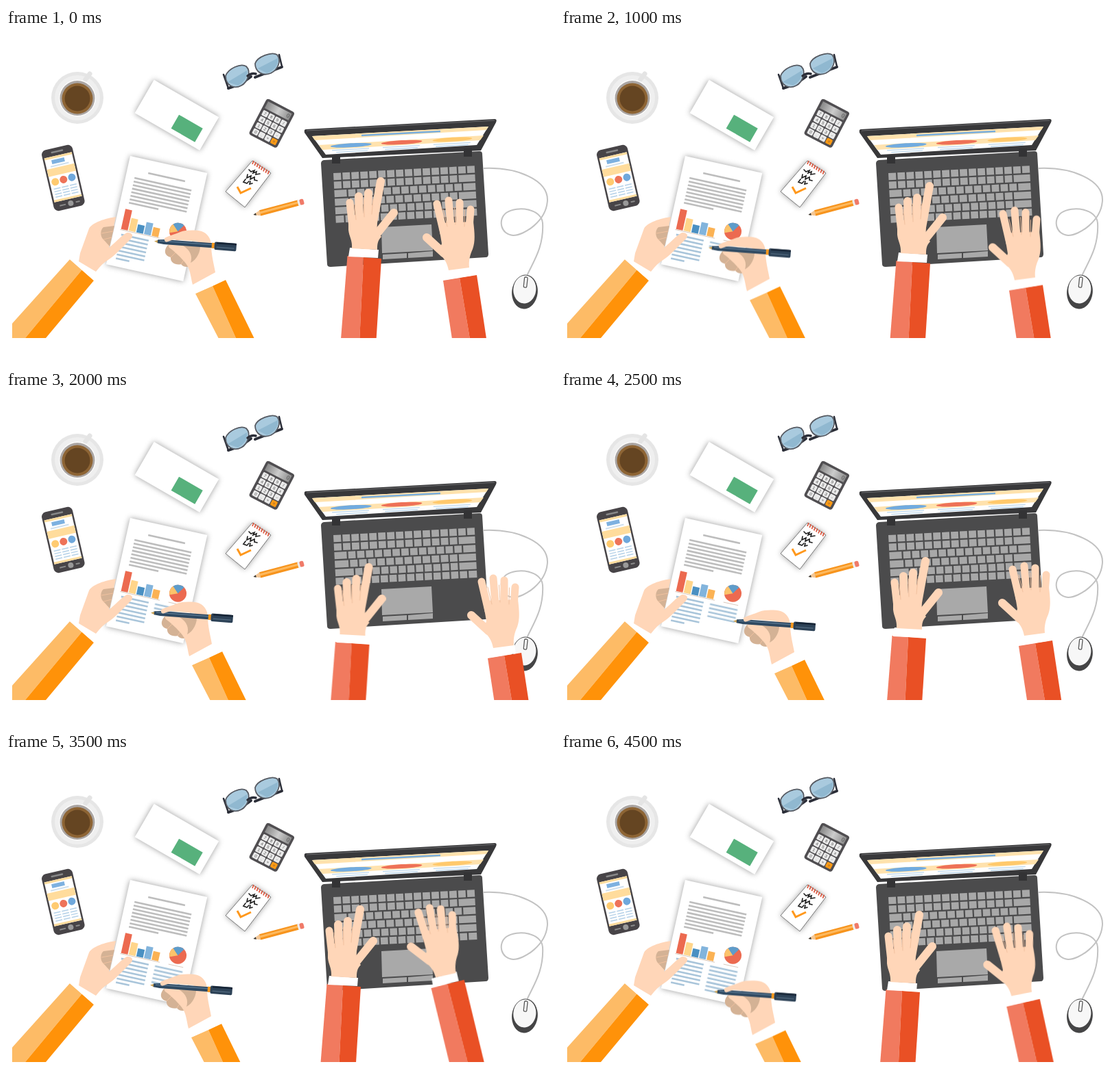
Recreate the animation shown at these times as an HTML page. Size 800 by 488 pixels, loop 5000 ms.

```html
<!DOCTYPE html>
<html lang="en">
<head>
<meta charset="utf-8">
<title>Desk work</title>
<style>
html, body { margin: 0; width: 100%; height: 100%; overflow: hidden; background: #fff; }
svg { display: block; width: 100vw; height: 100vh; }
.shadow { filter: drop-shadow(0 0 4px #999); }
.skin { fill: #ffd6b8; }
.fingers { stroke: #ffd6b8; stroke-linecap: round; fill: none; }
.crease { stroke: #f1c19f; stroke-width: 1; fill: none; stroke-linecap: round; }
.shade { fill: #d4b295; }
.cuff { fill: #fff; }
#typeRight { transform-origin: 661px 364px; }
</style>
</head>
<body>
<svg viewBox="0 0 800 488" preserveAspectRatio="none">
  <defs>
    <clipPath id="stage"><rect x="9" width="782" height="453"/></clipPath>
    <linearGradient id="display"><stop stop-color="#888"/><stop offset=".5" stop-color="#ccc"/><stop offset="1" stop-color="#8c8c8c"/></linearGradient>
  </defs>

  <g id="cup">
    <circle cx="104" cy="102" r="38" fill="#e6e6e6"/>
    <circle cx="104" cy="102" r="33" fill="#efefef"/>
    <path d="M116 75 122 67" stroke="#e4e4e4" stroke-width="7" stroke-linecap="round"/>
    <circle cx="104" cy="102.500" r="27" fill="#fafafa"/>
    <circle cx="104" cy="102.500" r="25.500" fill="#aaa5a3"/>
    <circle cx="104" cy="103" r="22.500" fill="#8d6434"/>
    <circle cx="104" cy="103" r="18.500" fill="#654522"/>
  </g>

  <g id="phone" transform="translate(83.300 219) rotate(-13)">
    <rect x="-23" y="-45.500" width="46" height="91" rx="7" fill="#474447"/>
    <rect x="-9" y="-41" width="18" height="2.500" rx="1" fill="#888"/>
    <rect x="-20.500" y="-34" width="41" height="66" fill="#fff"/>
    <path d="M-20.500-34h41v3h-41zM-20.500-17h41v11h-41zM-20.500 29h41v3h-41z" fill="#ffdc9c"/>
    <rect x="-11" y="-29" width="19" height="6" fill="#7db1e0"/>
    <path d="M-14-20H13" stroke="#cfe0ee" stroke-width="2"/>
    <circle cx="-12.500" cy="3" r="5.500" fill="#ffcb70"/>
    <circle cy="2.500" r="5.500" fill="#ee7359"/>
    <circle cx="12.500" cy="2" r="5.500" fill="#6fa8dc"/>
    <path d="M-17 13h10m2 0H5m2 0h10M-17 17h10m2 0H5m2 0h10M-17 21h10m2 0H5m2 0h10M-17 25h10m2 0H5m2 0h10" stroke="#b5d1e8" stroke-width="1.500"/>
    <circle cx="2.500" cy="38.500" r="4" fill="#999"/>
    <path d="M-14 38.500h9m15 0h6" stroke="#8a8a8a" stroke-width="2"/>
  </g>

  <g id="envelope" transform="translate(248.500 127) rotate(30)">
    <rect class="shadow" x="-54" y="-28" width="109" height="56" fill="#fff"/>
    <rect x="3" y="-2" width="40" height="23" fill="#57b17c"/>
  </g>

  <g id="glasses" stroke-linejoin="round" stroke-linecap="round">
    <path d="M324 88Q342 83 357 71M363 72Q386 63 402 57" stroke="#2b2e38" stroke-width="4" fill="none"/>
    <path d="M317 68 324 88M398 39 402 56" stroke="#2b2e38" stroke-width="2.500"/>
    <g fill="#a9cade" stroke="#565a62" stroke-width="1.800">
      <path d="M320 70C324 59 342 51 350 56C358 64 352 79 343 84C332 90 320 84 320 70Z"/>
      <path d="M363 52C366 42 387 34 395 39C402 48 396 61 386 66C374 71 363 64 363 52Z"/>
    </g>
    <path d="M323 79 351 62C353 72 345 81 338 84ZM367 59 396 44C398 55 389 63 380 66Z" fill="#86b1ca" opacity=".7"/>
    <path d="M352 70Q358 65 364 67" fill="none" stroke="#2b2e38" stroke-width="3.500"/>
  </g>

  <g id="calculator" transform="translate(387.300 139.300) rotate(27.500)">
    <rect x="-23" y="-29.500" width="46" height="59" rx="4" fill="#504e51"/>
    <rect x="-19.500" y="-26" width="39" height="11" fill="url(#display)"/>
    <text x="18" y="-18" font-size="8" text-anchor="end" fill="#555" font-family="Arial, 'Liberation Sans', sans-serif">0</text>
    <g id="calcKeys"></g>
  </g>

  <g id="notepad">
    <path class="shadow" d="M359 194 386 212 348 262 320 239Z" fill="#fff"/>
    <path d="M359 194 386 212 348 262 320 239Z" fill="#fff" stroke="#777" stroke-width="1"/>
    <g id="rings" stroke="#dd5a42" stroke-width="1.800"></g>
    <path d="M354 207l3 3 5-2-2 4 5-2-1 4 6-1M352 214l-1 5 6-3-1 5 6-3 0 4 4 1M349 221l-3 4 5 2 3-3M356 224l-1 4 4-1" fill="none" stroke="#222" stroke-width="1.700" stroke-linecap="round"/>
    <path d="M337 232 342 241 357 234" fill="none" stroke="#ff981c" stroke-width="3"/>
  </g>

  <g id="pencil" transform="translate(360.500 273) rotate(-15)">
    <path d="M0 0 10-4V4Z" fill="#f3c796"/>
    <path d="M0 0 4-1.800V1.800Z" fill="#333"/>
    <path d="M10-4.200H68V4.200H10Z" fill="#f7941d"/>
    <path d="M10-2H68V1H10Z" fill="#fdb95e"/>
    <path d="M67-4.200h4v8.400h-4z" fill="#eee"/>
    <rect x="70" y="-4.200" width="6" height="8.400" rx="2" fill="#f07a68"/>
  </g>

  <g id="document" transform="translate(181 187) rotate(12.500)">
    <rect class="shadow" width="115" height="162" fill="#fff"/>
    <g id="print" stroke-width="2.600"></g>
    <g id="pie" transform="translate(91.700 92.500) rotate(-12.500)">
      <circle r="12.500" fill="#ec6a50"/>
      <path d="M0 0-12.300 2A12.500 12.500 0 0 1-6-11Z" fill="#fbc36b"/>
      <path d="M0 0-7-10.400A12.500 12.500 0 0 1 9-8.700Z" fill="#5e9cca"/>
    </g>
    <g id="written" stroke="#a9c5da" stroke-width="2.600"></g>
  </g>

  <g id="holdArm" clip-path="url(#stage)">
    <path d="M93 338 110.500 353.500 28 453H-10Z" fill="#fdbb66"/>
    <path d="M110.500 353.500 128 369 58 453H28Z" fill="#ff9209"/>
    <path class="cuff" d="M93 338 104 330 137 354 128 369Z"/>
    <path class="skin" d="M106 341 108 329 121 293C126 284 145 278 160 276L150 321C157 316 168 303 176 299C184 298 187 304 181 309C170 320 158 333 150 338C143 342 137 348 131 356Z"/>
    <path class="shade" d="M158 289 142 291C137 295 137 305 142 309L151 319Z"/>
    <path class="crease" d="M139 300 156 297M142 309 154 306"/>
  </g>

  <g id="laptop">
    <path d="M437 148 712 133Q716 133 714 138L692 179 461 190 435 153Q434 148 437 148Z" fill="#38383a"/>
    <path d="M438 150 712 135" stroke="#6d6d6f"/>
    <path id="screen" d="M446 158 703 144 686 171 466 185Z" fill="#fff"/>
    <path d="M446 158 703 144 700 149 450 164ZM456 171 696 157 691 164 461 178Z" fill="#ffe2ad"/>
    <path d="M518 157 633 151" stroke="#78aede" stroke-width="2.500"/>
    <g transform="rotate(-3.300)">
      <ellipse cx="492" cy="200" rx="30" ry="3" fill="#71abdf"/>
      <ellipse cx="566" cy="200" rx="30" ry="3" fill="#ee7157"/>
      <ellipse cx="640" cy="200" rx="29" ry="3" fill="#ffc96c"/>
      <path d="M464 206h54m20 0h54m20 0h54M470 209h46m25 0h48m26 0h48" stroke="#bcd7ec" stroke-width="1.300"/>
    </g>
    <path d="M463 193 690 180Q694 180 694 184L703 330Q703 335 699 335L473 349Q468 349 468 345L459 198Q459 194 463 193Z" fill="#4b4b4c"/>
    <path d="M475 186h12v12h-12zM667 176h12v12h-12z" fill="#333335"/>
    <g id="keys" transform="translate(477 212) rotate(-3)" fill="#a8a8a8"></g>
    <path d="M547 291 620 287 622 325 548 329ZM549 331 584 329V336L549 338ZM586 329 622 326V334L586 336Z" fill="#a9a9a9"/>
  </g>

  <path d="M696 205C745 203 789 222 789 251C788 282 755 303 739 303C721 302 716 280 729 270C746 259 780 264 782 285C784 320 768 342 759 362" fill="none" stroke="#c2c2c2" stroke-width="2"/>
  <g id="mouse" transform="rotate(6 756 385)">
    <ellipse cx="756" cy="385.500" rx="18.800" ry="25" fill="#454546"/>
    <ellipse cx="755.500" cy="382" rx="16.500" ry="20.500" fill="#f7f7f7"/>
    <rect x="753.500" y="364" width="4.500" height="15" rx="1.500" fill="#fff" stroke="#555" stroke-width="1.300"/>
  </g>

  <g clip-path="url(#stage)">
    <g id="writer">
      <path d="M276 388 301 377 335 453H309.500Z" fill="#fdbb66"/>
      <path d="M301 377 320 368 361.500 453H335Z" fill="#ff9209"/>
      <path class="cuff" d="M268 375 305 355 312 356 320 368 276 388Z"/>
      <path class="shade" d="M236 317C229 325 231 333 240 335C239 343 248 347 255 345C259 351 268 350 276 344L283 318Z"/>
      <path class="crease" d="M240 335 252 323M255 345 264 332" stroke="#b99678"/>
      <path class="skin" d="M230 308C236 303 246 302 254 298C262 295 276 295 285 297C293 300 298 306 299 316C299 332 303 345 305 357L272 375C269 364 269 353 262 344C255 335 244 325 238 321C234 315 240 311 246 313L262 317 281 312Z"/>
      <path class="shade" d="M258 318C266 319 276 316 283 316C284 326 278 339 269 343C272 334 269 325 258 318Z"/>
      <g transform="translate(216 311.500) rotate(4.200)">
        <path d="M0 0 6-2.500V2.500Z" fill="#c9a053"/>
        <path d="M5-2.500 14-3.500H88V3.500H14L5 2.500Z" fill="#2f4961"/>
        <path d="M8-1H86" stroke="#57758f" stroke-width="1.500"/>
        <path d="M84-4h4v8h-4z" fill="#f7981d"/>
        <rect x="88" y="-5.500" width="32" height="11.500" rx="2" fill="#2d4257"/>
        <path d="M91-4H120" stroke="#172536" stroke-width="2.500"/>
        <path d="M91 2H117" stroke="#536b80" stroke-width="1.300"/>
      </g>
      <path class="fingers" d="M234 309.500Q244 305 256 305" stroke-width="6"/>
    </g>

    <g id="typeLeft">
      <path d="M497.500 333 521 335 514 480H486Z" fill="#f17a5f"/>
      <path d="M521 335 547 337 538 480H514Z" fill="#e95025"/>
      <path class="cuff" d="M501 321 543 324 542 336 499 334Z"/>
      <path class="fingers" d="M501 255 506 300" stroke-width="11"/>
      <path class="fingers" d="M514 246 516 300M528 241 526 300M546 224 534 290" stroke-width="12"/>
      <path class="fingers" d="M565 270 537 305" stroke-width="12"/>
      <path class="skin" d="M499 275 540 270 541 298 547 305C541 311 541 317 541 324L504 322C505 310 500 305 499 295Z"/>
      <path class="crease" d="M508 258 510 280M521.500 250 522 276M535 250 533 272"/>
    </g>

    <g id="typeRight">
      <path d="M637 369 661 365 687 520H660Z" fill="#f17a5f"/>
      <path d="M661 365 686 361 710 520H687Z" fill="#e95025"/>
      <path class="cuff" d="M639 355 676 348 678 362 640 368Z"/>
      <path class="fingers" d="M628 257 638 300M645 252 649 300M661 255 661 300M677 265 674 305" stroke-width="11"/>
      <path class="fingers" d="M613 306 638 329" stroke-width="12"/>
      <path class="skin" d="M630 285 681 283C683 300 684 312 680 323C676 332 674 340 675 350L645 354C643 344 640 338 630 328L635 315Z"/>
      <path class="crease" d="M637 265 643 290M653.500 262 655 287M668.500 266 668 290"/>
    </g>
  </g>
</svg>
<script>
const STEP = 500;
const $ = id => document.getElementById(id);
const rule = (x1, x2, y, color = '') =>
  `<path d="M${x1} ${y}H${x2}"${color && ` stroke="${color}"`}/>`;
const rect = (x, y, w, h, fill = '') =>
  `<rect x="${x}" y="${y}" width="${w}" height="${h}"${fill && ` fill="${fill}"`}/>`;
const repeat = (n, draw) => Array.from({ length: n }, (_, i) => draw(i)).join('');

// Calculator keys
$('calcKeys').innerHTML = repeat(16, i => {
  const x = -15 + i % 4 * 10, y = -8 + Math.floor(i / 4) * 10;
  return `<rect x="${x - 4.4}" y="${y - 4.2}" width="8.8" height="8.4" rx="1.5" fill="${i === 15 ? '#ff9a14' : '#eaeaea'}"/>` +
    `<text x="${x}" y="${y + 2}" font-size="6" text-anchor="middle" fill="#555" font-family="Arial, 'Liberation Sans', sans-serif">${'789/456x123-0.+='[i]}</text>`;
});

$('rings').innerHTML = repeat(8, i =>
  `<path d="M${361 + i * 3.2} ${194 + i * 2.1}l-2 5"/>`);

// Printed page: title, paragraph, bar chart, first column
const BLUE = '#a9c5da', GREY = '#bdbdbd';
const columnLine = (x, i) => rule(x, x + (i === 6 ? 20 : 41), 115 + i * 5.9);
const bars = [[30, '#ec6a50'], [19, '#ffd58a'], [12, '#4a90c2'], [18, '#82b4dc'], [13, '#fbb254']];
$('print').innerHTML =
  rule(31, 86, 18.8, GREY) +
  repeat(8, i => rule(13, i === 7 ? 57 : 98, 30 + i * 5.3, GREY)) +
  bars.map(([h, fill], i) => rect(10 + i * 11.4, 107 - h, 10, h, fill)).join('') +
  `<path d="M9 108H68M81 108H103" stroke="#d9c9bd" stroke-width="1"/>` +
  `<g stroke="${BLUE}">${repeat(7, i => columnLine(12, i))}</g>`;
$('written').innerHTML = repeat(7, i => columnLine(62.5, i));

// Keyboard: widths of the first and last key of each row
const KEY_ROWS = [[11, 11], [11, 24], [18, 18], [20, 25], [27, 25], [12, 12]];
const KEY_GAP = 2.2;
$('keys').innerHTML = KEY_ROWS.map(([first, last], row) => {
  const space = 206 - first - last - KEY_GAP;
  const count = Math.round(space / 13);
  const pitch = space / count;
  const y = row * 12.5;
  return rect(0, y, first, 10.3) + rect(206 - last, y, last, 10.3) +
    repeat(count, i => rect(first + KEY_GAP + i * pitch, y, pitch - KEY_GAP, 10.3));
}).join('');

// One pose per step: x, y and optional turn in degrees
const POSES = {
  writer: [[0, 0], [37, 10], [-1, 9.5], [37, 20], [-5, 14], [35, 26], [32.5, 32], [-6, 29], [30.5, 38.5], [7, 38.5]],
  typeLeft: [[0, 0], [-4, 4], [-9, 7], [19.5, 6], [-17.5, 35], [-15, 26], [-12, 17], [-30, 6], [-47, -5], [-24, 14]],
  typeRight: [[0, 0], [8, 7], [16, 14.5], [-1, -22], [65, 23], [30, 5], [-6, -13], [-18, -26, -5], [-29, -38.5, -10], [12, 1.5, -3.7]],
};
const LINES_WRITTEN = [0, 1, 2, 3, 3, 4, 5, 5, 6, 7];

function playSteps(element, states) {
  const frames = [...states, states.at(-1)].map((state, i) =>
    ({ ...state, offset: i / states.length, easing: 'step-end' }));
  return element.animate(frames, { duration: states.length * STEP, iterations: Infinity });
}

const players = Object.entries(POSES).map(([id, poses]) =>
  playSteps($(id), poses.map(([x, y, turn = 0]) =>
    ({ transform: `translate(${x}px, ${y}px) rotate(${turn}deg)` }))));
[...$('written').children].forEach((line, i) =>
  players.push(playSteps(line, LINES_WRITTEN.map(n => ({ opacity: n > i ? 1 : 0 })))));

// Keep every part on the same clock
const start = document.timeline.currentTime ?? 0;
players.forEach(player => { player.startTime = start; });
</script>
</body>
</html>
```
